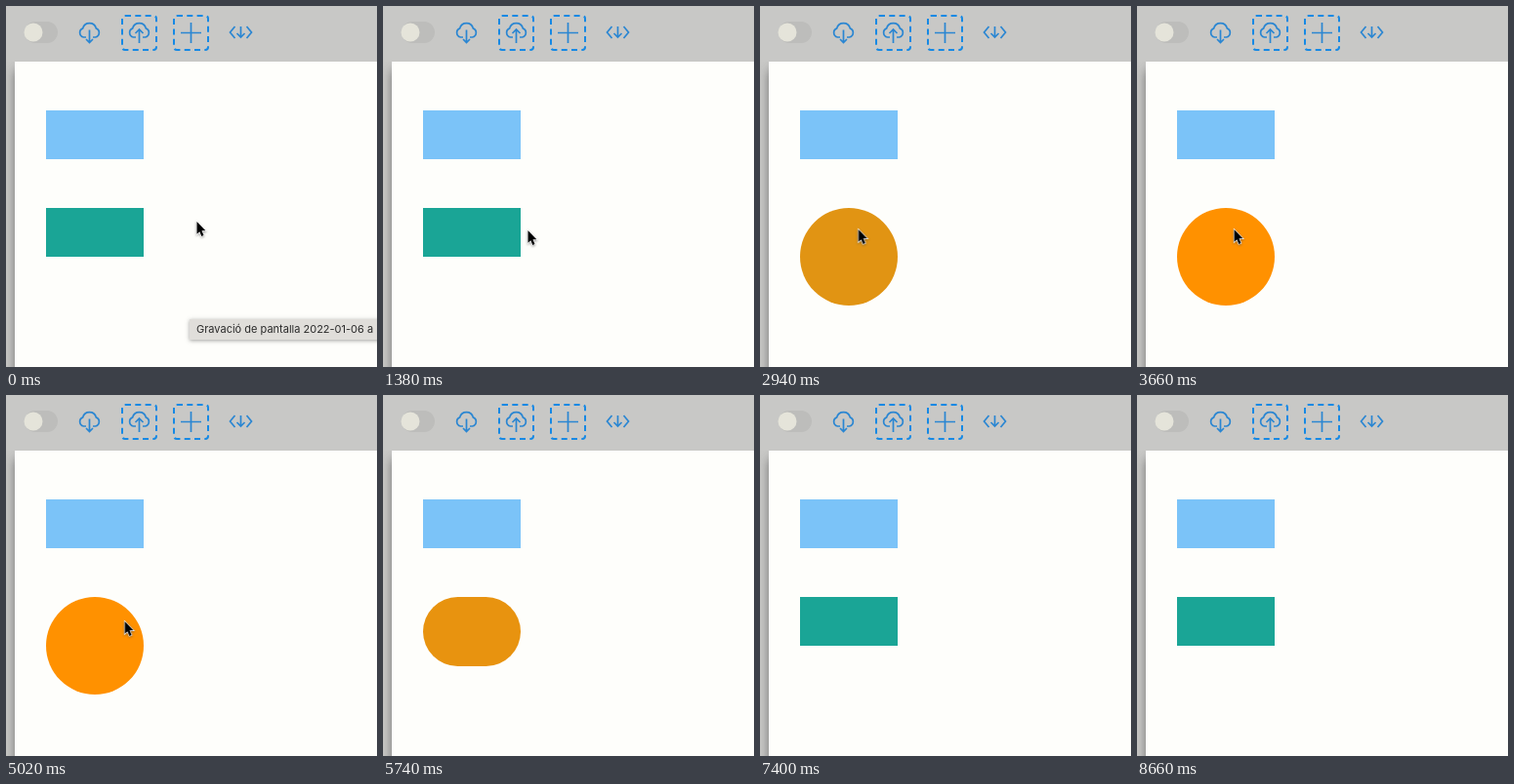
An HTML page that plays this animation: 380 px wide and 370 px high, repeating every 9320 ms.

```html
<!DOCTYPE html>
<html lang="ca">
<head>
<meta charset="utf-8">
<title>Hover transition</title>
<style>
  :root { --loop: 9320ms linear infinite; }
  html, body { margin: 0; width: 100%; height: 100%; overflow: hidden; }
  body { position: relative; background: #c8c8c6; }
  body > * { position: absolute; }

  .page {
    left: 9px; top: 57px; width: 400px; height: 400px;
    background: #fefefb;
    box-shadow: 0 9px 10px rgba(50, 50, 50, .55);
  }
  .bar { left: 0; top: 0; width: 380px; height: 57px; background: #c8c8c6; }
  .icons { left: 0; top: 0; }
  .icons path { fill: none; stroke: #2a86d2; stroke-width: 1.7; }
  .drop {
    top: 9px; width: 33px; height: 33px;
    border: 2px dashed #1689e4; border-radius: 4px;
  }

  .box { left: 41px; width: 100px; height: 50px; }
  .blue { top: 107px; background: #7bc3f8; }
  .green {
    top: 207px; background: #1aa596;
    animation: grow var(--loop), tint var(--loop);
  }
  @keyframes grow {
    0%, 17.06%, 66.09%, 100% { height: 50px; border-radius: 0; }
    27.79%, 55.36% { height: 100px; border-radius: 100px; }
  }
  @keyframes tint {
    0%, 22.21%, 71.24%, 100% { background: #1aa596; }
    32.94%, 60.52% { background: #ff9100; }
  }

  .tip {
    left: 188px; top: 321px; width: 240px; height: 21px;
    box-sizing: border-box; padding-left: 7px;
    font: 11px/21px Inter, sans-serif; color: #2b2b2b; white-space: nowrap;
    background: #e0deda; box-shadow: 0 1px 4px rgba(70, 70, 70, .5);
    animation: fade var(--loop);
  }
  @keyframes fade {
    0%, 4.5% { opacity: 1; }
    7%, 99.99% { opacity: 0; }
    100% { opacity: 1; }
  }

  .cursor {
    left: 0; top: 1px; overflow: visible;
    filter: drop-shadow(0 1px 1px rgba(70, 70, 70, .5));
    animation: move var(--loop);
  }
  @keyframes move {
    0%, 10.5% { transform: translate(195px, 220px); }
    14.81% { transform: translate(148px, 229px); }
    17.06% { transform: translate(140px, 230px); }
    25.32% { transform: translate(119px, 228px); }
    32%, 39.27% { transform: translate(99px, 228px); }
    53.86% { transform: translate(121px, 231px); }
    55.36% { transform: translate(140px, 231px); }
    59.01%, 99.99% { transform: translate(390px, 226px); }
    100% { transform: translate(195px, 220px); }
  }
</style>
</head>
<body>
  <div class="page"></div>
  <div class="bar"></div>
  <svg class="icons" width="380" height="57">
    <defs>
      <path id="cloud" d="M-3.5 4.5H-6A4.75 4.75 0 0 1-6.8-4.6A7 7 0 0 1 6.8-4.6A4.75 4.75 0 0 1 6 4.5H3.5"/>
    </defs>
    <rect x="19" y="16" width="34" height="22" rx="11" fill="#bdbdbb"/>
    <circle cx="28" cy="27" r="9.5" fill="#e5e4da"/>
    <g transform="translate(85.5 27.5)">
      <use href="#cloud"/>
      <path d="M0-3V10M-3.5 6.5L0 10 3.5 6.5"/>
    </g>
    <g transform="translate(136.5 27.5)">
      <use href="#cloud"/>
      <path d="M0 10.5V-3.5M-4 .5L0-3.5 4 .5"/>
    </g>
    <path d="M189.5 17V38M179 27.5H200"/>
    <path transform="translate(240.5 27)" d="M-6-6L-11 0-6 6M6-6L11 0 6 6M0-6V5M-4 1L0 5 4 1"/>
  </svg>
  <div class="drop" style="left: 118px"></div>
  <div class="drop" style="left: 171px"></div>
  <div class="box blue"></div>
  <div class="box green"></div>
  <div class="tip">Gravació de pantalla 2022-01-06 a les</div>
  <svg class="cursor" width="12" height="19">
    <path d="M.5 0V12.8L3.3 10.2 5.3 14.9 7.5 13.9 5.5 9.3H9.4Z" stroke="#fff" stroke-width="1.3" paint-order="stroke"/>
  </svg>
</body>
</html>
```
